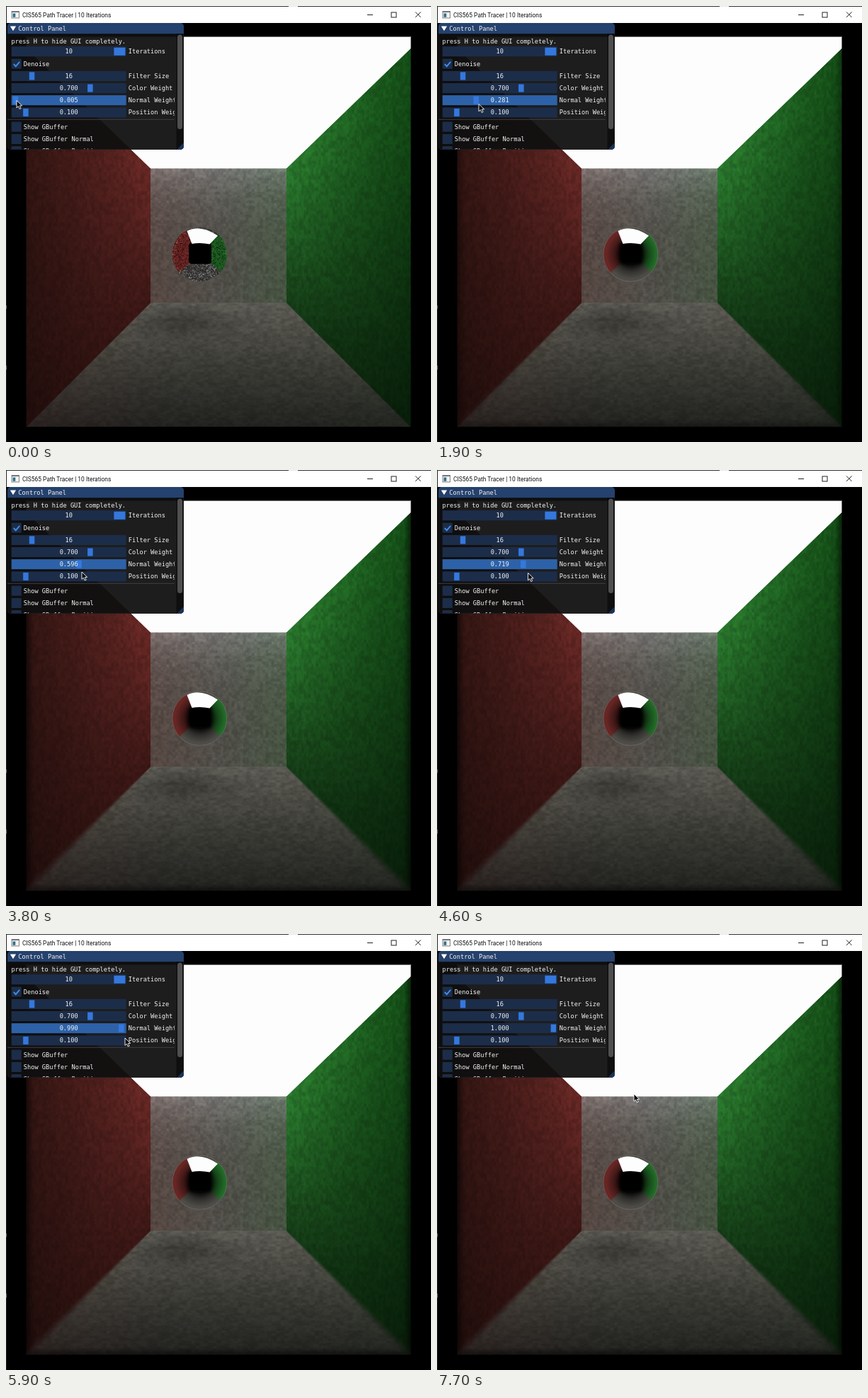
Recreate the animation shown at these times as an HTML page with a canvas. Size 600x616 px, loop 7800 ms.

```html
<!DOCTYPE html>
<html lang="en">
<head>
<meta charset="utf-8">
<title>Path tracer denoise panel</title>
<style>
  html, body { margin: 0; width: 100%; height: 100%; overflow: hidden; background: #000; }
  canvas, svg { position: absolute; left: 0; top: 0; width: 600px; height: 616px; }
  .mono { font: 8.66px "DejaVu Sans Mono", "Liberation Mono", monospace; fill: #f4f4f4; white-space: pre; }
  .title { font: 8.45px Roboto, "Open Sans", sans-serif; fill: #111; }
</style>
</head>
<body>
<canvas id="sharp" width="600" height="616"></canvas>
<canvas id="soft" width="600" height="616"></canvas>
<canvas id="ball" width="600" height="616"></canvas>
<canvas id="grain" width="600" height="616"></canvas>
<svg viewBox="0 0 600 616">
  <defs>
    <clipPath id="panelClip"><rect x="2" y="24" width="249" height="179" rx="5"/></clipPath>
    <clipPath id="bodyClip"><rect x="2" y="39" width="235.7" height="163.5"/></clipPath>
  </defs>
  <!-- window frame -->
  <rect width="600" height="24" fill="#fff"/>
  <rect width="1" height="616" fill="#222"/>
  <rect width="600" height="1" fill="#333"/>
  <rect x="399" width="13" height="1" fill="#e8e8e8"/>
  <path d="M.5 423v5M.5 508v6" stroke="#777"/>
  <rect x="8" y="7.5" width="10.5" height="9.5" fill="#f2f2f2" stroke="#777" stroke-width=".9"/>
  <rect x="8" y="7.5" width="10.5" height="1.6" fill="#777"/>
  <rect x="9.5" y="10.5" width="3.8" height="5.3" fill="#31718c"/>
  <text class="title" x="23" y="15.7">CIS565 Path Tracer | 10 Iterations</text>
  <g fill="none" stroke="#222" stroke-width="1">
    <path d="M510 12.5h8M578 8.5l7.5 7.5M585.5 8.5l-7.5 7.5"/>
    <rect x="544" y="9" width="7" height="7"/>
  </g>
  <!-- control panel -->
  <g clip-path="url(#panelClip)">
    <rect x="2" y="24" width="249" height="179" fill="#0f0f0f" fill-opacity=".94"/>
    <rect x="2" y="24" width="249" height="15.2" fill="#25416d"/>
    <path d="M5.8 28.4h8.4l-4.2 6.8z" fill="#fff"/>
    <rect x="240.5" y="39.2" width="10.5" height="164" fill="#050505" fill-opacity=".55"/>
    <rect x="242" y="40.5" width="7" height="133.5" rx="3.5" fill="#4f4f4f"/>
    <path d="M251 193v10h-10z" fill="#1b3358"/>
    <rect x="2" y="24" width="249" height="179" rx="5" fill="none" stroke="#43434e" stroke-opacity=".5"/>
    <text class="mono" x="17.3" y="34.6">Control Panel</text>
    <g id="body" clip-path="url(#bodyClip)"></g>
  </g>
  <path id="cursor" d="M0 0v10.4l2.5-2.3 1.7 3.9 1.9-.8-1.7-3.8h3.3z" fill="#000" stroke="#fff" stroke-width=".9"/>
</svg>
<script>
const $ = id => document.getElementById(id);
const clamp = (x, lo = 0, hi = 1) => Math.min(hi, Math.max(lo, x));
const lerp = (a, b, k) => a + (b - a) * k;
const mix = (a, b, k) => a.map((x, i) => lerp(x, b[i], k));
const smooth = (a, b, x) => { const k = clamp((x - a) / (b - a)); return k * k * (3 - 2 * k); };

let seed = 565;
const random = () => {
  seed = (seed * 1664525 + 1013904223) >>> 0;
  return seed / 4294967296;
};

// smooth value noise in -1..1
const N = 256;
const lattice = Float32Array.from({ length: N * N }, () => random() * 2 - 1);
function noise(x, y) {
  const ix = Math.floor(x), iy = Math.floor(y);
  const at = (i, j) => lattice[((iy + j) & (N - 1)) * N + ((ix + i) & (N - 1))];
  const fx = smooth(0, 1, x - ix), fy = smooth(0, 1, y - iy);
  return lerp(lerp(at(0, 0), at(1, 0), fx), lerp(at(0, 1), at(1, 1), fx), fy);
}
const mottle = (x, y, sx, sy) =>
  1 + .11 * noise(x / sx, y / sy) + .06 * noise(x / sx * 2.1 + 70, y / sy * 2.1 + 30);

// ---- room: one colour function for each surface ----
const ceilingY = u => 229.5 - Math.max(0, u - 96) * .966;
const floorY = u => 323 + u;

function backWall(x, y) {
  const c = mix([79, 77, 71], [118, 118, 116], Math.exp(-(y - 230) / 42));
  const side = (x - 300) / 96;
  c[0] += clamp(-side) * 6 - clamp(side) * 9;
  c[1] += clamp(side) * 6 - clamp(-side) * 7;
  c[2] -= Math.abs(side) * 6;
  const m = mottle(x, y, 4, 4);
  return c.map(v => v * m);
}
function sideWall(x, y, u) {
  const k = clamp((u - 96) / 176);
  const s = clamp((y - ceilingY(u)) / (floorY(u) - ceilingY(u)));
  const left = x < 300;
  const c = left ? mix([96, 37, 34], [50, 21, 18], k) : mix([36, 104, 39], [17, 66, 19], k);
  const light = left ? 1.1 - .48 * s : 1.18 - .6 * s - .16 * k * s;
  const m = light * mottle(x, y, 3.4, 5.5);
  return c.map(v => v * m);
}
function floor(x, y) {
  const k = (y - 419) / 176;
  const c = k < .46 ? mix([92, 91, 84], [61, 61, 55], k / .46)
                    : mix([61, 61, 55], [33, 33, 31], (k - .46) / .54);
  c[0] += clamp((230 - x) / 200) * 8;
  c[1] += clamp((x - 370) / 200) * 3;
  const shadow = 1 - .26 * Math.exp(-(((x - 250) / 62) ** 2) - ((y - 446) / 20) ** 2);
  const m = shadow * mottle(x, y, 6, 3.6);
  return c.map(v => v * m);
}

function drawRoom(id, soft) {
  const ctx = $(id).getContext("2d");
  const img = ctx.createImageData(544, 552);
  let p = 0;
  for (let y = 43; y < 595; y++) for (let x = 28; x < 572; x++) {
    const u = Math.abs(x + .5 - 300);
    const lit = clamp(ceilingY(u) - y);
    let c = [253, 253, 254];
    if (lit < 1) {
      if (u <= 96) c = y < 419 ? backWall(x, y) : floor(x, y);
      else {
        const w = soft ? .7 + (u - 96) / 176 * 9 : .7;
        const wall = smooth(-w, w, (floorY(u) - y) / 1.41);
        c = wall >= 1 ? sideWall(x, y, u)
          : wall <= 0 ? floor(x, y) : mix(floor(x, y), sideWall(x, y, u), wall);
      }
      const shade = soft ? .55 + .45 * smooth(0, 13, Math.min(272 - u, 595 - y)) : 1;
      c = mix(c.map(v => v * shade), [253, 253, 254], lit);
    }
    img.data[p++] = c[0];
    img.data[p++] = c[1];
    img.data[p++] = c[2];
    img.data[p++] = 255;
  }
  ctx.putImageData(img, 28, 43);
  // half-covered border pixels
  ctx.strokeStyle = "rgba(0,0,0,.5)";
  ctx.strokeRect(28.5, 43.5, 543, 551);
}

// ---- mirror ball ----
function drawBall(id, grainy) {
  const ctx = $(id).getContext("2d");
  const shape = (color, path, blur = 0) => {
    ctx.filter = blur ? `blur(${blur}px)` : "none";
    ctx.fillStyle = color;
    ctx.fill(new Path2D(path));
    ctx.filter = "none";
  };
  const blur = grainy ? 0 : 1;
  ctx.translate(0, .6);
  ctx.save();
  ctx.beginPath();
  ctx.arc(273.3, 350.3, 38.6, 0, 7);
  ctx.clip();
  shape(grainy ? "#3b3a39" : "#4d4c47", "M230 305h90v90h-90z");
  shape(grainy ? "#672220" : "#662624", "M254 310L262 335 259 363 242 379 225 360V310z", blur);
  shape(grainy ? "#1b5a1e" : "#216a27", "M301 321L288 335 289 363 304 376 320 360V320z", blur);
  if (grainy) {
    for (let i = 0; i < 2700; i++) {
      const a = random() * 6.283, r = 40 * Math.sqrt(random());
      const dx = Math.cos(a) * r, dy = Math.sin(a) * r;
      const bottom = dy > 12 && dy > Math.abs(dx) * .8;
      const light = random() < (bottom || r > 36 ? .5 : .3);
      const power = bottom ? .6 : r > 36 ? .4 : .2;
      ctx.fillStyle = light ? `rgba(225,225,222,${random() * power})` : `rgba(0,0,0,${random() * .6})`;
      ctx.fillRect(273 + dx, 350 + dy, 1.1, 1.1);
    }
  } else {
    const dark = ctx.createRadialGradient(274, 350, 15, 274, 350, 35);
    dark.addColorStop(0, "rgba(0,0,0,.85)");
    dark.addColorStop(.5, "rgba(0,0,0,.35)");
    dark.addColorStop(1, "rgba(0,0,0,0)");
    shape(dark, "M230 305h90v90h-90z");
  }
  const core = "M263 334H286Q290 334 290 338V359Q290 364 285 364H263Q258 364 258 359V338Q258 334 263 334z";
  shape("#000", core, grainy ? .4 : 2);
  shape("#fdfdfd", "M255.5 317.5Q274 307.5 299 324L287.5 336Q274 333 262.5 335.5z");
  ctx.restore();
  if (!grainy) {
    ctx.strokeStyle = "rgba(150,148,140,.35)";
    ctx.lineWidth = 1;
    ctx.beginPath();
    ctx.arc(273.3, 350.3, 38.3, 0, 7);
    ctx.stroke();
  }
}

// ---- panel widgets ----
function add(tag, attrs, text) {
  const el = document.createElementNS("http://www.w3.org/2000/svg", tag);
  for (const k in attrs) el.setAttribute(k, attrs[k]);
  if (text) el.textContent = text;
  return $("body").appendChild(el);
}
const label = (x, y, text, anchor = "start") =>
  add("text", { class: "mono", x, y: y + 3, "text-anchor": anchor }, text);
const box = (x, y, width, height, fill) => add("rect", { x, y, width, height, fill });
const FRAME = "#1c2d49", ACTIVE = "#2d62a8", GRAB = "#3478dc";
const grabX = v => 9 + v * 151.6;

function slider(y, name, value, x, width = 7.5) {
  const frame = box(7.7, y - 7, 162, 14.1, FRAME);
  const grab = box(x, y - 5.5, width, 11.1, GRAB);
  const text = label(88.7, y, value, "middle");
  label(172.8, y, name);
  return { frame, grab, text };
}
function checkbox(y, name) {
  box(7.7, y - 7, 14.1, 14.1, FRAME);
  label(24.8, y, name);
}

label(7.5, 49.6, "press H to hide GUI completely.");
slider(64.2, "Iterations", "10", 152.4, 16);
checkbox(81.6, "Denoise");
add("path", { d: "M10.8 82l3 3.2 5.4-6.4", fill: "none", stroke: "#3f8ae8", "stroke-width": 1.9 });
slider(98.9, "Filter Size", "16", 32.8);
slider(116, "Color Weight", "0.700", grabX(.7));
const normal = slider(133.1, "Normal Weight", "0.005", grabX(.005));
slider(150.4, "Position Weight", "0.100", grabX(.1));
box(2, 159.8, 236.5, .9, "#44444f");
checkbox(170.6, "Show GBuffer");
checkbox(187.9, "Show GBuffer Normal");
checkbox(205.1, "Show GBuffer Position");

drawRoom("sharp", false);
drawRoom("soft", true);
drawBall("ball", false);
drawBall("grain", true);

// time, weight, pointer x, pointer y
const LOOP = 7800, RELEASE = 6800;
const steps = [
  [0, .005, 15, 133.5],
  [1100, .167, 40, 136],
  [2700, .394, 78, 141],
  [3800, .596, 107, 144],
  [4600, .719, 128.5, 145.5],
  [5900, .990, 168, 147],
  [6100, 1, 173, 147.5],
  [6800, 1, 176, 148],
  [7500, 1, 278, 226],
  [7800, 1, 278, 226]
];

function render(now) {
  const t = Math.floor(now % LOOP / 100) * 100;
  const i = steps.findIndex((s, n) => n > 0 && t < s[0]);
  const a = steps[i - 1], b = steps[i];
  const [, v, x, y] = mix(a, b, (t - a[0]) / (b[0] - a[0]));
  normal.grab.setAttribute("x", grabX(v));
  normal.text.textContent = v.toFixed(3);
  normal.frame.setAttribute("fill", t < RELEASE ? ACTIVE : FRAME);
  $("cursor").setAttribute("transform", `translate(${x} ${y})`);
  $("soft").style.opacity = clamp((v - .17) / .2);
  $("grain").style.opacity = clamp(1 - (v - .005) / .06);
}
function tick() {
  render(performance.now());
  requestAnimationFrame(tick);
}
tick();
</script>
</body>
</html>
```
